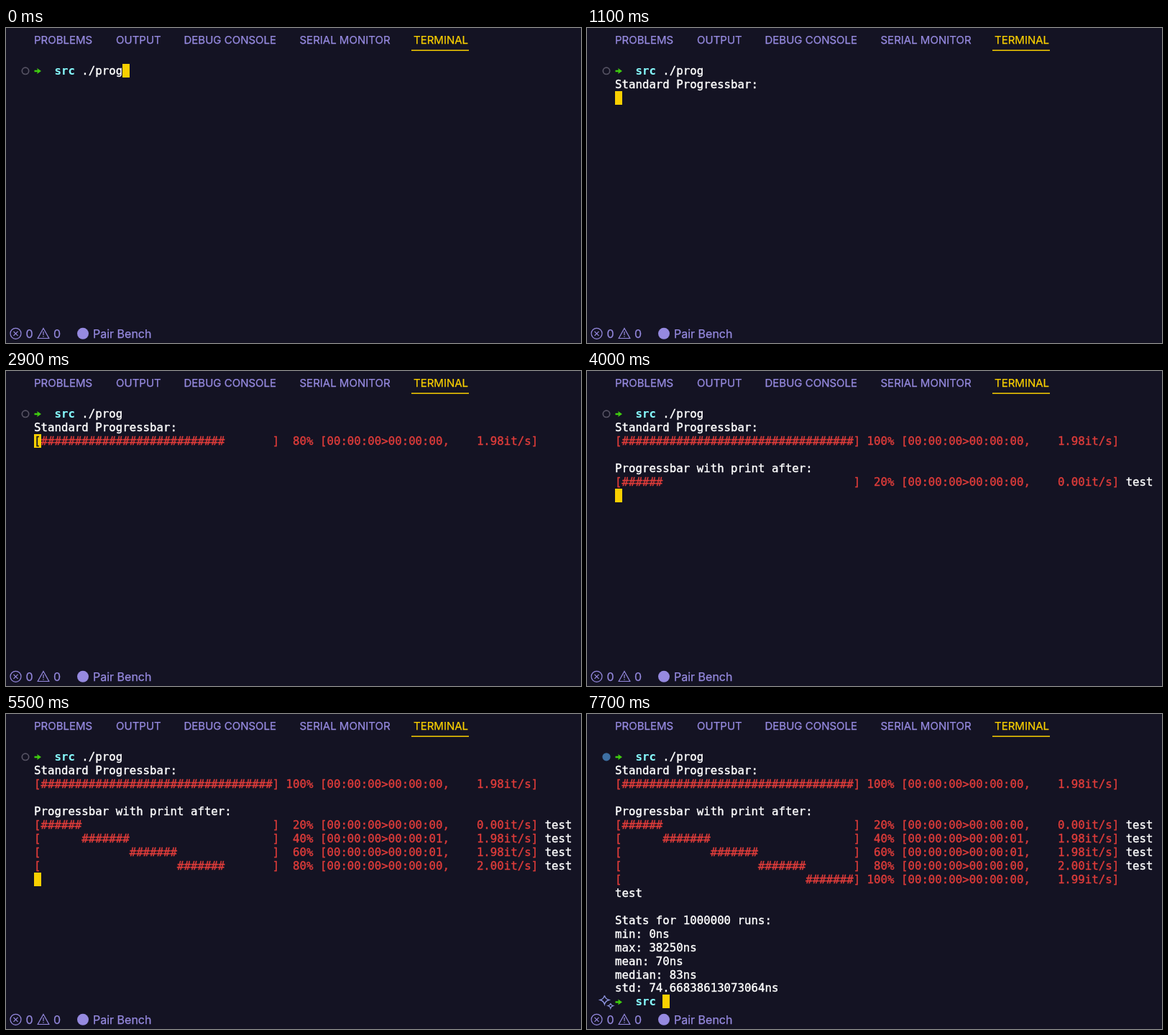
Recreate the animation shown at these times as an HTML page with a canvas. Size 800 by 439 pixels, loop 8.9 s.

```html
<!DOCTYPE html>
<html lang="en">
<head>
<meta charset="utf-8">
<title>Terminal progress bars</title>
<style>
  html, body { margin: 0; width: 100%; height: 100%; overflow: hidden; background: #141323; }
  canvas { display: block; }
</style>
</head>
<body>
<canvas id="stage" width="800" height="439"></canvas>
<script>
const ctx = document.getElementById('stage').getContext('2d');
const LOOP = 8900;
const LEFT = 39, TOP = 50, CELL = 9.475, ROW = 18.97;
const BG = '#141323', PURPLE = '#968ae0', YELLOW = '#fad000', WHITE = '#fff',
      RED = '#de3c3a', CYAN = '#86f8fb', GREEN = '#3fcb10';
const UI = 'Inter, sans-serif';
const MONO = '15.74px "DejaVu Sans Mono", monospace';

const TABS = [['PROBLEMS', 39], ['OUTPUT', 153], ['DEBUG CONSOLE', 247.5],
              ['SERIAL MONITOR', 408.5], ['TERMINAL', 567]];
const STATS = ['Stats for 1000000 runs:', 'min: 0ns', 'max: 38250ns', 'mean: 70ns',
               'median: 83ns', 'std: 74.66838613073064ns'];
const STEP_TIMES = [1400, 1900, 2400, 2900, 3400];
const PRINT_TIMES = [4000, 4500, 5000, 5500, 6000];
const RATES = ['0.00', '1.98', '1.98', '1.98', '1.98'];
const PRINT_RATES = ['0.00', '1.98', '1.98', '2.00', '1.99'];

// Text with a hairline outline, for the heavier look of desktop font smoothing
function inkText(text, x, y, font, color, weight) {
  ctx.font = font;
  ctx.fillStyle = ctx.strokeStyle = color;
  ctx.lineWidth = weight;
  ctx.fillText(text, x, y);
  ctx.strokeText(text, x, y);
}

function label(text, x, y, size, color) {
  inkText(text, x, y, `${size}px ${UI}`, color, 0.25);
}

// Monospaced text on the terminal grid
function write(text, row, col = 0, color = WHITE, bold = false) {
  const font = (bold ? 'bold ' : '') + MONO;
  [...text].forEach((ch, i) => {
    if (ch === ' ') return;
    inkText(ch, LEFT + (col + i) * CELL, TOP + row * ROW + 15, font, color, bold ? 0.1 : 0.4);
  });
}

function cursor(row, col = 0) {
  ctx.fillStyle = YELLOW;
  ctx.fillRect(Math.round(LEFT + col * CELL), Math.round(TOP + row * ROW), 10, 19);
}

function poly(points, close = true) {
  ctx.beginPath();
  points.forEach(([x, y]) => ctx.lineTo(x, y));
  if (close) ctx.closePath();
}

function circle(x, y, r) {
  ctx.beginPath();
  ctx.arc(x, y, r, 0, Math.PI * 2);
}

function prompt(row) {
  const y = TOP + row * ROW + 10;
  ctx.fillStyle = GREEN;
  poly([[39.5, y - 1.2], [43.8, y - 1.2], [43.2, y - 4], [49, y],
        [43.2, y + 4], [43.8, y + 1.2], [39.5, y + 1.2]]);
  ctx.fill();
  write('src', row, 3, CYAN, true);
}

function bar(row, step, rate, from = 0) {
  const end = Math.floor(34 * step / 5);
  const fill = ' '.repeat(from) + '#'.repeat(end - from);
  const percent = `${step * 20}%`.padStart(4);
  const left = step === 2 || step === 3 ? '01' : '00';
  write(`[${fill.padEnd(34)}] ${percent} [00:00:00>00:00:${left},    ${rate}it/s]`, row, 0, RED);
}

function sparkle(x, y, r) {
  ctx.beginPath();
  ctx.moveTo(x, y - r);
  for (let i = 1; i <= 4; i++) {
    const a = i * Math.PI / 2;
    const m = a - Math.PI / 4;
    ctx.quadraticCurveTo(x + Math.sin(m) * r * 0.3, y - Math.cos(m) * r * 0.3,
                         x + Math.sin(a) * r, y - Math.cos(a) * r);
  }
  ctx.stroke();
}

function chrome() {
  ctx.fillStyle = BG;
  ctx.fillRect(0, 0, 800, 439);
  for (const [name, x] of TABS) label(name, x, 22, 15, name === 'TERMINAL' ? YELLOW : PURPLE);
  ctx.fillRect(564, 30.4, 80, 1.5);

  ctx.strokeStyle = PURPLE;
  ctx.lineWidth = 1.2;
  circle(13.5, 425.8, 7.5);
  ctx.stroke();
  for (const s of [-1, 1]) {
    poly([[10.5, 425.8 - 3 * s], [16.5, 425.8 + 3 * s]], false);
    ctx.stroke();
  }
  poly([[52, 418.5], [59.8, 432.5], [44.2, 432.5]]);
  ctx.stroke();
  poly([[52, 423], [52, 428]], false);
  ctx.stroke();
  ctx.fillStyle = PURPLE;
  ctx.fillRect(51.4, 429.3, 1.2, 1.3);
  circle(107, 425.8, 8);
  ctx.fill();
  label('0', 27.5, 431.6, 16, PURPLE);
  label('0', 66, 431.6, 16, PURPLE);
  label('Pair Bench', 121, 431.6, 16, PURPLE);
}

function draw(t) {
  chrome();
  const done = t >= 6200;
  circle(27, 59.8, done ? 5.6 : 4.7);
  ctx.fillStyle = '#3d6fa3';
  ctx.strokeStyle = '#565363';
  ctx.lineWidth = 1.7;
  done ? ctx.fill() : ctx.stroke();

  prompt(0);
  write('./prog', 0, 7);
  if (t < 900) return cursor(0, 13);

  write('Standard Progressbar:', 1);
  const step = STEP_TIMES.filter(s => t >= s).length;
  if (step) bar(2, step, RATES[step - 1]);
  if (step < 5) {
    cursor(2);
    if (step) write('[', 2, 0, BG);
    return;
  }

  write('Progressbar with print after:', 4);
  const printed = PRINT_TIMES.filter(s => t >= s).length;
  for (let i = 0; i < printed; i++) {
    bar(5 + i, i + 1, PRINT_RATES[i], Math.floor(34 * i / 5));
    if (i < 4) write('test', 5 + i, 75);
  }
  if (printed < 5) return cursor(5 + printed);

  write('test', 10);
  if (t < 6100) return cursor(11);

  STATS.forEach((line, i) => write(line, 12 + i));
  prompt(18);
  cursor(18, 7);
  if (done) {
    ctx.strokeStyle = '#8f96e2';
    ctx.lineWidth = 1.3;
    sparkle(24.4, 398.5, 6.2);
    sparkle(32.8, 406.7, 3.4);
  }
}

function tick() {
  draw(performance.now() % LOOP);
  requestAnimationFrame(tick);
}
tick();
</script>
</body>
</html>
```
